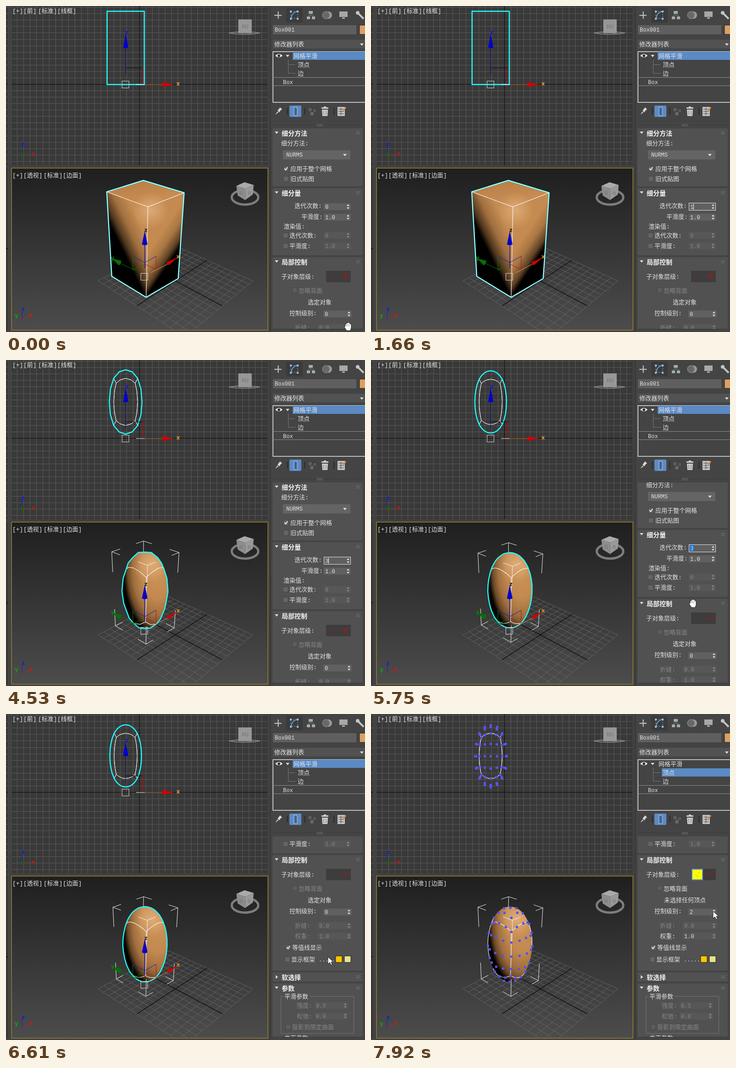
An HTML page that plays this animation: 784 px wide and 714 px high, repeating every 7990 ms.

```html
<!DOCTYPE html>
<html lang="zh">
<head>
<meta charset="utf-8">
<title>Mesh smoothing</title>
<style>
html, body { margin: 0; width: 100%; height: 100%; overflow: hidden; background: #444; }
svg { display: block; width: 100%; height: 100%; }
text { font: 13px "Liberation Mono", "Noto Sans CJK SC", "Noto Sans CJK", monospace; fill: #e4e4e4; white-space: pre; }
.mono { font-size: 12px; }
.bold { font-weight: bold; font-size: 14px; fill: #f2f2f2; }
.axis { font: bold 12px "DejaVu Sans", sans-serif; }
.off { fill: #868686; }
.sub .wakes { fill: #e4e4e4; }
.sub .plain, svg:not(.sub) .picked { display: none; }
</style>
</head>
<body>
<svg id="stage" viewBox="0 0 784 714" preserveAspectRatio="none"></svg>
<script>
const LOOP = 7990;
const CELL = 14.07;
const stage = document.getElementById('stage');

// Markup helpers
const rect = (x, y, w, h, fill, more = '') => `<rect x="${x}" y="${y}" width="${w}" height="${h}" fill="${fill}" ${more}/>`;
const line = (d, stroke, width = 1, more = '') => `<path d="${d}" fill="none" stroke="${stroke}" stroke-width="${width}" ${more}/>`;
const shape = (d, fill, more = '') => `<path d="${d}" fill="${fill}" ${more}/>`;
const label = (x, y, s, cls = '', more = '') => `<text x="${x}" y="${y}" class="${cls}" ${more}>${s}</text>`;
const group = (inner, more = '') => `<g ${more}>${inner}</g>`;
const toPath = (ps, close = true) => 'M' + ps.map(p => p.map(c => c.toFixed(1)).join()).join('L') + (close ? 'Z' : '');
const gradient = (id, kind, box, stops) => `<${kind}Gradient id="${id}" gradientUnits="userSpaceOnUse" ${box}>` +
  stops.map(([at, color, alpha = 1]) => `<stop offset="${at}" stop-color="${color}" stop-opacity="${alpha}"/>`).join('') + `</${kind}Gradient>`;
const down = (x, y, fill = '#ddd') => shape(`M${x - 4} ${y - 2}h8l-4 5z`, fill);

// Unit square to quadrilateral, homogeneous result
function quadMap([x0, y0], [x1, y1], [x2, y2], [x3, y3]) {
  const ax = x1 - x2, ay = y1 - y2, bx = x3 - x2, by = y3 - y2;
  const sx = x0 - x1 + x2 - x3, sy = y0 - y1 + y2 - y3, den = ax * by - bx * ay;
  const g = (sx * by - bx * sy) / den, h = (ax * sy - sx * ay) / den;
  return (u, v) => [
    (x1 - x0 + g * x1) * u + (x3 - x0 + h * x3) * v + x0,
    (y1 - y0 + g * y1) * u + (y3 - y0 + h * y3) * v + y0,
    g * u + h * v + 1];
}
const flat = ([x, y, w]) => [x / w, y / w];
const floorMap = quadMap([201, 602], [355.7, 518.6], [539, 602], [391, 725]);
const baseMap = quadMap([231, 592], [298, 556], [376, 597], [306, 638]);
const topMap = quadMap([220, 407], [300, 382], [389, 409], [310, 440]);
const inPersp = ([i, j, k]) => {
  const top = topMap(i, j);
  return flat(baseMap(i, j).map((c, n) => c * (1 - k) + top[n] * 0.86 * k));
};
const inFront = ([i, , k]) => [220.7 + 81.3 * i, 172 - 160.5 * k];

// Catmull-Clark; old vertices keep their index
const mean = ps => [0, 1, 2].map(n => ps.reduce((s, p) => s + p[n], 0) / ps.length);
const edgeKey = (a, b) => Math.min(a, b) + '-' + Math.max(a, b);
function smooth({ pts, faces, iso }) {
  const edges = new Map();
  const centers = faces.map(f => mean(f.map(i => pts[i])));
  faces.forEach((f, n) => f.forEach((a, k) => {
    const b = f[(k + 1) % 4], key = edgeKey(a, b);
    if (!edges.has(key)) edges.set(key, { a, b, sides: [], id: pts.length + edges.size });
    edges.get(key).sides.push(centers[n]);
  }));
  const all = [...edges.values()];
  const idOf = (a, b) => edges.get(edgeKey(a, b)).id;
  const moved = pts.map((p, i) => {
    const F = mean(centers.filter((_, n) => faces[n].includes(i)));
    const mids = all.filter(e => e.a === i || e.b === i).map(e => mean([pts[e.a], pts[e.b]]));
    const R = mean(mids), n = mids.length;
    return p.map((c, k) => (F[k] + 2 * R[k] + (n - 3) * c) / n);
  });
  const split = all.map(e => mean([pts[e.a], pts[e.b], ...e.sides]));
  const first = pts.length + all.length;
  return {
    pts: [...moved, ...split, ...centers],
    faces: faces.flatMap((f, n) => f.map((a, k) => [a, idOf(a, f[(k + 1) % 4]), first + n, idOf(f[(k + 3) % 4], a)])),
    iso: iso.flatMap(([a, b]) => [[a, idOf(a, b)], [idOf(a, b), b]])
  };
}
const cube = { pts: [], faces: [[0, 2, 3, 1], [4, 5, 7, 6], [0, 1, 5, 4], [2, 6, 7, 3], [0, 4, 6, 2], [1, 3, 7, 5]], iso: [] };
for (let n = 0; n < 8; n++) {
  cube.pts.push([n & 1, n >> 1 & 1, n >> 2]);
  for (const bit of [1, 2, 4]) if (!(n & bit)) cube.iso.push([n, n | bit]);
}
const meshes = [cube];
while (meshes.length < 4) meshes.push(smooth(meshes.at(-1)));

function hull(points) {
  const sorted = [...points].sort((p, q) => p[0] - q[0] || p[1] - q[1]);
  const half = ps => {
    const out = [];
    for (const p of ps) {
      while (out.length > 1) {
        const [a, b] = out.slice(-2);
        if ((b[0] - a[0]) * (p[1] - a[1]) - (b[1] - a[1]) * (p[0] - a[0]) > 0) break;
        out.pop();
      }
      out.push(p);
    }
    return out.slice(0, -1);
  };
  return [...half(sorted), ...half(sorted.reverse())];
}
const area = ps => ps.reduce((s, [x, y], n) => {
  const [nx, ny] = ps[(n + 1) % ps.length];
  return s + x * ny - nx * y;
}, 0);
const facing = (mesh, spots) => mesh.faces.filter(f => area(f.map(i => spots[i])) > 0);
const outline = spots => line(toPath(hull(spots)), '#1ffcff', 2.4, 'class="plain" stroke-linejoin="round"');

// Bounding box corners, back or front ones
function brackets(mesh, back) {
  const lo = [0, 1, 2].map(k => Math.min(...mesh.pts.map(p => p[k])));
  const hi = [0, 1, 2].map(k => Math.max(...mesh.pts.map(p => p[k])));
  let d = '';
  for (const corner of cube.pts) {
    if ((corner[0] === 1 && corner[1] === 0) !== back) continue;
    const at = corner.map((c, k) => c ? hi[k] : lo[k]);
    at.forEach((c, k) => {
      const end = [...at];
      end[k] += (corner[k] ? -1 : 1) * (hi[k] - lo[k]) * 0.25;
      d += toPath([inPersp(at), inPersp(end)], false);
    });
  }
  return line(d, '#f4f4f4');
}
function frontMesh(mesh) {
  const spots = mesh.pts.map(inFront);
  return line(mesh.iso.map(e => toPath(e.map(i => spots[i]), false)).join(''), '#eee') + outline(spots);
}
function perspMesh(mesh, n) {
  const spots = mesh.pts.map(inPersp);
  const seen = new Set(facing(mesh, spots).flatMap(f => f.map((a, k) => edgeKey(a, f[(k + 1) % 4]))));
  const iso = line(mesh.iso.filter(([a, b]) => seen.has(edgeKey(a, b)))
    .map(e => toPath(e.map(i => spots[i]), false)).join(''), '#fff', 1.1);
  const side = (ids, fill) => shape(toPath(ids.map(i => spots[i])), `url(#${fill})`);
  const body = toPath(hull(spots));
  if (!n) {
    return side([4, 5, 7, 6], 'lid') + side([4, 6, 2, 0], 'left') + side([6, 7, 3, 2], 'right') +
      shape(body, 'url(#shine)') + outline(spots) + iso;
  }
  return brackets(mesh, true) + shape(body, 'url(#egg)') + shape(body, 'url(#shine)') + iso + outline(spots) + brackets(mesh, false);
}
function markers(project, count, hideBack) {
  const mesh = meshes[3], spots = mesh.pts.map(project);
  const seen = new Set(facing(mesh, spots).flat());
  return spots.slice(0, count).filter((_, i) => !hideBack || seen.has(i))
    .map(([x, y]) => rect(Math.round(x) - 2, Math.round(y) - 2, 5, 5, '#5753f4')).join('');
}

// Viewports
function grid() {
  let d = '';
  for (let n = -20; n < 20; n++) {
    const x = Math.round(n * CELL) + 291.5, y = Math.round(n * CELL) + 171.5;
    if (x > 12 && x < 571) d += `M${x} 0V349`;
    if (y > 0 && y < 349) d += `M12 ${y}H571M0 ${y}H5`;
  }
  return line(d, '#595959') + line('M12 171.5H571M291.5 0V349M0 171.5H5', '#080808');
}
function floor() {
  const cross = s => toPath([flat(floorMap(s, 0)), flat(floorMap(s, 1))], false) + toPath([flat(floorMap(0, s)), flat(floorMap(1, s))], false);
  let d = '';
  for (let n = 0; n <= 14; n++) if (n !== 7) d += cross(n / 14);
  return line(d, '#6c6c6c', .8) + line(cross(.5), '#000', 1.1);
}
const titles = (y, starts, names) => names.map((s, n) => label(starts[n], y, `[${s}]`)).join('');
const axisName = (x, y, s, fill) => label(x, y, s, 'axis', `style="fill:${fill}"`);
const handle = (x, y) => rect(x, y, 15, 15, 'none', 'stroke="#d4d4d4"');
const frontGizmo = line('M261.5 92V150', '#15156e', 1.4) + line('M261 135.5H299', '#0b0b0b') + line('M298.5 135V172', '#d00000', 1.3) +
  line('M284 172H303', '#fff') + line('M303 172H342', '#d07a28') + shape('M261.5 61L267 91Q261.5 94 256 91Z', '#0000d0') +
  shape('M367 172L342 177Q340 172 342 167Z', '#d40000') + handle(253.5, 164.5) +
  axisName(260, 62, 'z', '#1414d8') + axisName(372, 174, 'x', '#e8963a');
const perspGizmo = line('M303 523V574', '#0d0dc0', 1.3) + line('M277 548L303 562L328 548', '#1717b8') +
  line('M277 548V578L303 565', '#0a7a0a') + line('M328 548V577L303 565', '#c01010') + line('M250 564L285 580', '#087208') +
  line('M317 584L355 564', '#d9a070') + shape('M303 493L309 522Q303 526 297 522Z', '#0000c8') +
  shape('M232 553L252 558Q251 566 246 568Z', '#067006') + shape('M374 551L351 561Q352 567 357 567Z', '#d00000') + handle(294.5, 585.5) +
  axisName(302, 495, 'z', '#222') + axisName(229, 556, 'y', '#0a7d0a') + axisName(372, 553, 'x', '#e88a2a');
const tripods = line('M35.5 307V325', '#1c1cd0') + line('M36 325H51', '#b81818') + axisName(34, 306, 'z', '#1c1cd0') + axisName(33, 328, 'y', '#0b6e0b') + axisName(56, 328, 'x', '#c81818') +
  line('M35.5 668V686', '#1c1cd0') + line('M36 686L50 680', '#c02020') + axisName(34, 668, 'z', '#1c1cd0') + axisName(19, 682, 'y', '#12a012') + axisName(50, 681, 'x', '#d41818');
const faceMark = (x, y, s, size) => label(x, y, s, '', `style="fill:#757575;font-size:${size}px"`);
const viewCubes = line('M487 59Q522 54 555 59Q522 65 487 59Z', '#8f8f8f', 1.4) + rect(508, 30, 28, 29, '#979797', 'stroke="#a8a8a8"') + faceMark(515, 49, 'HU', 12) +
  `<ellipse cx="522" cy="419" rx="29" ry="16" fill="none" stroke="#7d7d7d" stroke-width="5"/>` +
  shape('M503 394L521 386L541 392L523 400Z', '#aaa') + shape('M503 394L523 400L522 425L506 415Z', '#8d8d8d') + shape('M541 392L523 400L522 425L539 413Z', '#999') +
  faceMark(509, 413, '前', 9) + faceMark(527, 413, '右', 9);

// Command panel
const swatch = (x, y, fill) => rect(x, y, 14, 14, fill, 'stroke="#222"');
const field = (x1, x2, y, value, on = true, more = '') => rect(x1, y + 1, x2 - x1, 15, on ? '#606060' : '#575757') +
  label(x1 + 3, y + 12.5, value, on ? 'mono' : 'mono off', more) +
  shape(`M${x2 - 9} ${y + 7}l3-4l3 4zM${x2 - 9} ${y + 10}l3 4l3-4z`, on ? '#ddd' : '#8a8a8a');
const check = (x, y, ticked, on = true) => rect(x, y, 11, 11, on ? '#656565' : '#5c5c5c', 'stroke="#474747"') +
  (ticked ? line(`M${x + 2} ${y + 5}l3 3l4-6`, '#f0f0f0', 1.8) : '');
function rollout(y, h, title, open = true) {
  let dots = '';
  for (let n = 0; n < 12; n++) dots += rect(765 + n % 4 * 2, y + 7 + (n >> 2) * 2.5, 1, 1, '#8c8c8c');
  return rect(582, y, 197, h, '#515151', 'rx="2"') + label(602, y + 15.5, title, 'bold') + dots +
    shape(open ? `M587 ${y + 7}h8l-4 5z` : `M589 ${y + 6}v8l5-4z`, '#ddd');
}
const dotMarks = 'M709 593h2v2h-2zM712 596h2v2h-2zM715 588h2v2h-2z';
const scrolled = rollout(268, 127, '细分方法') + label(601, 305, '细分方法:') + rect(605, 316, 147, 20, '#646464') +
  label(612, 330, 'NURMS', 'mono') + down(740, 326) + check(606, 351, true) + label(621, 361, '应用于整个网格') + check(606, 373) + label(621, 383, '旧式贴图') +
  rollout(399, 147, '细分量') + label(630, 442, '迭代次数:') + field(694, 753, 431, '0', true, 'id="iter"') +
  rect(694.5, 431.5, 58, 16, 'none', 'id="focus" stroke="#e8e8e8"') + rect(704, 433, 1, 13, '#fff', 'id="caret"') +
  label(645, 465.5, '平滑度:') + field(694, 753, 454, '1.0') + label(606, 487, '渲染值:') +
  check(605, 497) + label(619, 507, '迭代次数:') + field(694, 753, 494, '0', false) +
  check(605, 520) + label(619, 530, '平滑度:') + field(694, 753, 517, '1.0', false) +
  rollout(550, 253, '局部控制') + label(601, 596.5, '子对象层级:') + rect(699, 580, 54, 25, '#3d3d3d') +
  group(shape(dotMarks, '#b01414') + line('M734 593L746 587L742 597L738 594Z', '#b01414', 1.5), 'id="icons"') +
  group(rect(701, 581, 23, 23, '#ff0', 'stroke="#5d8fd0" stroke-width="2"') + shape(dotMarks, '#d8b800'), 'id="pressed"') +
  check(625, 617, false, false) + label(639, 628, '忽略背面', 'off wakes') + label(659, 652.5, '选定对象', 'plain') + label(640, 652.5, '未选择任何顶点', 'picked') +
  label(619, 676.5, '控制级别:') + field(693, 755, 666, '0', true, 'id="level"') + label(631, 708.5, '折缝:', 'off') + field(681, 755, 696, '0.0', false) +
  label(631, 732, '权重:', 'off wakes') + field(681, 755, 719, '<tspan class="off wakes">1.0</tspan>', false) +
  check(611, 747, true) + label(625, 757, '等值线显示') + check(609, 773) + label(623, 783, '显示框架') + label(683, 783, '.....', 'mono') + swatch(720, 771, '#ffc600') + swatch(739, 771, '#e4e48c') +
  rollout(807, 20, '软选择', false) + rollout(831, 160, '参数') + line('M606 859.5H600.5V940.5H759.5V859.5H663', '#747474') + label(608, 864, '平滑参数') +
  label(635, 884, '强度:', 'off') + field(674, 747, 871, '0.5', false) + label(635, 907, '松弛:', 'off') + field(674, 747, 894, '0.0', false) +
  check(611, 921, false, false) + label(625, 931, '投影到限定曲面', 'off') + label(608, 955, '曲面参数');

const tabs = line('M594.5 12V28M586 20.5H602', '#c8c8c8', 2) + rect(612, 4, 36, 32, '#3b3b3b') + rect(622, 12, 15, 15, 'none', 'stroke="#86a4be" stroke-dasharray="3 2"') +
  line('M623 27Q624 14 637 12', '#69b4f2', 1.6) + shape('M620 26h4v4h-4zM635 10h4v4h-4zM620 10h4v4h-4zM635 26h4v4h-4z', '#8fc0e8') +
  shape('M661 11h9v6h-9zM657 23h7v6h-7zM668 23h7v6h-7z', '#aaa') + line('M665.5 17V20M660.5 23V20H671.5V23', '#4f9c70') +
  '<circle cx="704" cy="20" r="8" fill="#999"/><circle cx="699" cy="20" r="8" fill="#686868" stroke="#999"/>' +
  shape('M728 12h18v12h-18zM734 25h6v3h-6z', '#a8a8a8') + line('M767 14L781 28', '#c4c4c4', 4) + '<circle cx="768" cy="15" r="4" fill="#c4c4c4"/>';
const tools = shape('M599 222l4 5l-3 1l-3 5l-4-4l4-5zM593 231l-5 7l7-5z', '#d8d8d8') + line('M614.5 223V238M652.5 223V238M716.5 223V238', '#222', 1.5) +
  rect(619, 218, 26, 25, '#5d8bc4', 'rx="2"') + rect(629, 222, 7, 18, '#3d6396', 'stroke="#dfe8f2" stroke-dasharray="3 1"') +
  '<circle cx="664" cy="227" r="5" fill="#5d5d5d" stroke="#333"/><circle cx="674" cy="229" r="5" fill="#555" stroke="#333"/><circle cx="668" cy="236" r="5" fill="#666" stroke="#333"/>' +
  shape('M689 222h15v3h-15zM694 220h5v2h-5zM690 227h13l-1 14h-11z', '#cfcfcf') + line('M694 229V239M699 229V239', '#666') +
  rect(724, 221, 16, 20, '#c4c4c4') + line('M726 226H738M726 231H738M726 236H738M731.5 223V239', '#444') + line('M736 230L742 222', '#e08a3c', 3);
const eye = shape('M588 109Q596 101 604 109Q596 116 588 109Z', '#eee') + '<circle cx="596" cy="109" r="3" fill="#333"/>';
const stack = rect(583, 100, 205, 111, '#444', 'stroke="#e6e6e6" stroke-width="1.5"') + rect(626, 100, 158, 18, '#5b8ac4', 'id="row"') +
  eye + down(615, 109) + label(628, 114, '网格平滑') + label(637, 133, '顶点') + label(637, 152, '边') +
  line('M616.5 118V147.5H632M616 128.5H632', '#aaa', 1, 'stroke-dasharray="1 1"') + line('M583 156.5H784M583 174.5H784', '#8e8e8e') + label(605, 171, 'Box', 'mono');
const panel = rect(577, 0, 207, 714, '#444') + line('M577.5 0V714', '#2e2e2e') + tabs + rect(583, 42, 182, 20, '#5f5f5f') + label(587, 56, 'Box001', 'mono') +
  rect(772, 42, 14, 20, '#dda062', 'stroke="#222"') + rect(583, 74, 204, 19, '#525252') + label(586, 88, '修改器列表') + down(777, 84) +
  stack + tools + line('M583 260.5H784', '#3b3b3b') + line('M679 259.5H692M679 262.5H692', '#aaa', 1, 'stroke-dasharray="1 1"') +
  group(group(scrolled, 'id="scroll"'), 'clip-path="url(#panelClip)"') + line('M582 707.5H780', '#3a3a3a');

const defs = `<defs><clipPath id="panelClip">${rect(581, 268, 199, 439, '#000')}</clipPath><clipPath id="viewClip">${rect(13, 356, 558, 353, '#000')}</clipPath>` +
  gradient('sky', 'linear', 'x1="0" y1="356" x2="0" y2="709"', [[0, '#1f1f1f'], [1, '#4c4c4c']]) +
  gradient('lid', 'linear', 'x1="300" y1="382" x2="310" y2="440"', [[0, '#b98048'], [1, '#cb9056']]) +
  gradient('left', 'linear', 'x1="261" y1="548" x2="315" y2="522"', [[0, '#000'], [.2, '#4f361d'], [.55, '#a06f3f'], [1, '#c58c52']]) +
  gradient('right', 'linear', 'x1="345" y1="580" x2="303" y2="552"', [[0, '#000'], [.22, '#5e4124'], [.6, '#a87643'], [1, '#c48a50']]) +
  gradient('egg', 'radial', 'cx="0" cy="0" r="1" gradientTransform="translate(330 455) scale(76 150)"', [[0, '#cd9257'], [.45, '#c28950'], [.7, '#a06f3f'], [.85, '#6b4927'], [.97, '#040200']]) +
  gradient('shine', 'radial', 'cx="316" cy="448" r="40"', [[0, '#ffd9ac', .4], [1, '#ffd9ac', 0]]) + '</defs>';

const hand = shape('M-6-1V-6h2.5V-8h3V-9h3v1.5h2.5V-5H7V3L5 9H-3L-7 3Q-9-1-6-1Z', '#fff', 'stroke="#222"') + line('M-3.5-5V0M-.5-7V0M2.5-6V0', '#777', .8);
const arrow = shape('M0 0V16L4 12L7 18L9.5 17L7 11H12Z', '#fff', 'stroke="#222"');
const ibeam = line('M-3-7.5H3M0-7V7M-3 7.5H3', '#eee', 1.2);
const toggles = (list, id) => list.map((s, n) => group(s, `id="${id}${n}"`)).join('');
const levels = [8, 26, 98];

stage.innerHTML = defs + rect(0, 0, 784, 714, '#414141') + rect(0, 0, 5, 349, '#393939') + rect(0, 354, 5, 356, '#393939') + rect(12, 0, 559, 349, '#393939') + grid() +
  line('M0 531.5H5', '#000') + line('M5.5 0V714M11.5 0V349', '#4e4e4e') + rect(12, 355, 560, 355, 'url(#sky)', 'stroke="#8a7530" stroke-width="1.8"') +
  group(floor(), 'clip-path="url(#viewClip)"') + titles(15, [14, 38, 70, 112], ['+', '前', '标准', '线框']) + titles(375, [14, 38, 82, 124], ['+', '透视', '标准', '边面']) + viewCubes + tripods +
  toggles(meshes.map((m, n) => frontMesh(m) + perspMesh(m, n)), 'mesh') + group(frontGizmo + perspGizmo, 'class="plain"') +
  toggles(levels.map(c => markers(inFront, c, false) + markers(inPersp, c, true)), 'dots') + panel +
  group(toggles([hand, arrow, ibeam], 'cursor'), 'id="cursor"');

// Timeline
const $ = id => document.getElementById(id);
const show = (id, on) => $(id).setAttribute('display', on ? 'inline' : 'none');
const passed = (t, times) => times.filter(at => t >= at).length;
const within = (t, spans) => spans.some(([a, b]) => t >= a && t < b);
const caretOn = [[1260, 1460], [1660, 1990], [2520, 2590], [2990, 3330], [3400, 3930], [4530, 5010]];
const notches = [5750, 5820, 5890, 5960, 6030, 6110, 6460, 6530, 6610];
const pointer = [[0, 747, 702], [70, 747, 702], [400, 728, 440], [480, 722, 440], [730, 592, 440], [1260, 592, 440], [5480, 700, 455], [5740, 703, 533], [6110, 703, 533],
  [6190, 703, 527], [6319, 703, 527], [6320, 703, 532], [6740, 703, 532], [7200, 711, 351], [7330, 711, 351], [7650, 747, 432], [LOOP, 747, 432]];
function pointerAt(t) {
  const n = pointer.findIndex(p => p[0] > t);
  const [t0, x0, y0] = pointer[n - 1], [t1, x1, y1] = pointer[n], s = (t - t0) / (t1 - t0);
  return [x0 + (x1 - x0) * s, y0 + (y1 - y0) * s];
}
$('iter').insertAdjacentHTML('beforebegin', rect(696, 432, 9, 14, '#1474d4', 'id="mark"'));

function render(t) {
  const iteration = passed(t, [1990, 3330, 5010]), level = passed(t, [7780, 7920]), sub = t >= 7310;
  stage.classList.toggle('sub', sub);
  meshes.forEach((_, n) => show('mesh' + n, n === iteration));
  levels.forEach((_, n) => show('dots' + n, sub && n === level));
  $('iter').textContent = passed(t, [1260, 2520, 4070]);
  $('level').textContent = level;
  $('level').style.fill = t >= 6460 ? '#e6e6a4' : '';
  show('focus', t >= 480);
  show('caret', within(t, caretOn));
  show('mark', within(t, [[660, 1260], [5480, LOOP]]));
  $('icons').setAttribute('opacity', t < 5480 ? 1 : .6);
  show('pressed', t >= 7230);
  $('row').setAttribute('x', sub ? 635 : 626);
  $('row').setAttribute('y', sub ? 119 : 100);
  $('scroll').setAttribute('transform', `translate(0 ${-Math.round(241 / 9 * passed(t, notches))})`);
  const [x, y] = pointerAt(t).map(Math.round);
  show('cursor', t < 1260 || t >= 5480);
  $('cursor').setAttribute('transform', `translate(${x} ${y})`);
  const kind = within(t, [[360, 1260], [5480, 5550]]) ? 2 : t >= 6110 ? 1 : 0;
  for (let n = 0; n < 3; n++) show('cursor' + n, n === kind);
}
const start = performance.now();
function tick() {
  render((performance.now() - start) % LOOP);
  requestAnimationFrame(tick);
}
tick();
</script>
</body>
</html>
```
